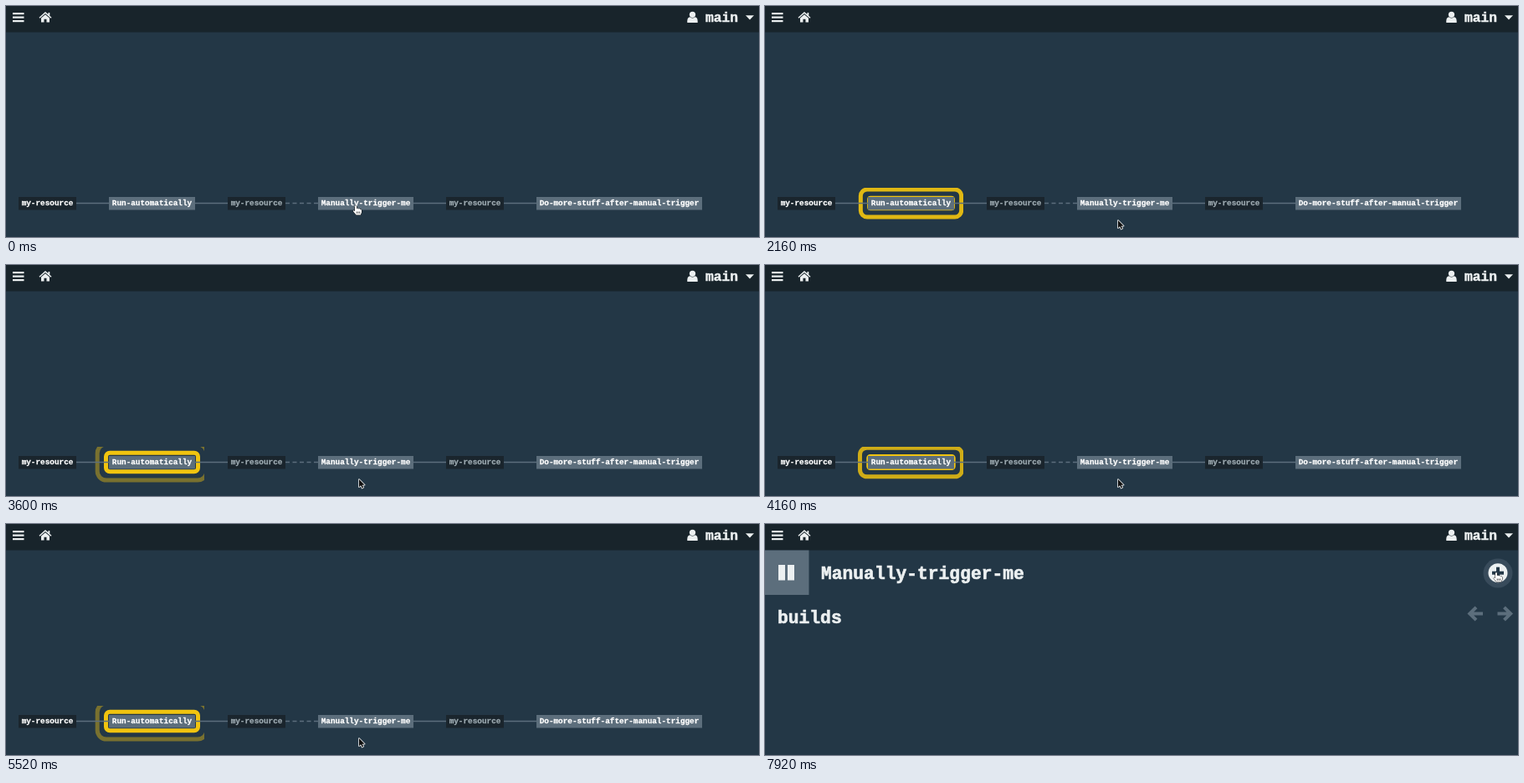
These frames come from a looping animation (900 by 277 pixels, 8000 ms). An HTML page with a canvas:

```html
<!DOCTYPE html>
<html lang="en">
<head>
<meta charset="utf-8">
<title>Pipeline</title>
<style>
html, body { margin: 0; width: 100%; height: 100%; overflow: hidden; background: #233746; }
canvas { display: block; }
</style>
</head>
<body>
<canvas id="stage" width="900" height="277"></canvas>
<script>
const ctx = document.getElementById('stage').getContext('2d');
const LOOP = 8000, STEP = 80;
const RUN_START = 1120, RUN_END = 6080, PAGE_SWITCH = 6800;
const RING_PERIOD = 960, RING_LIFE = 1920;
const BG = '#233746', BAR = '#18242b', DARK = '#1a252d', GREY = '#5c6e7c';
const LIGHT = '#ecf0f1', AMBER = '#f1c40f', GREEN = '#2ecc71', DIM = '#9daab1';
const MID_Y = 236.5;

const nodes = [
  { x: 15, w: 69, label: 'my-resource', fill: DARK, ink: '#fff' },
  { x: 123, w: 103, label: 'Run-automatically', fill: GREY, ink: '#fff' },
  { x: 265, w: 69, label: 'my-resource', fill: DARK, ink: DIM },
  { x: 373, w: 114, label: 'Manually-trigger-me', fill: GREY, ink: '#fff' },
  { x: 526, w: 69, label: 'my-resource', fill: DARK, ink: DIM },
  { x: 634, w: 198, label: 'Do-more-stuff-after-manual-trigger', fill: GREY, ink: '#fff' }
];

// Pointer tip: time, x, y
const pointerKeys = [
  [0, 418, 239], [480, 418, 239], [720, 422, 257], [6160, 422, 257],
  [6640, 427, 232], [6800, 427, 232], [7840, 873, 59], [7920, 874, 58]
];

function rect(x, y, w, h, fill) {
  ctx.fillStyle = fill;
  ctx.fillRect(x, y, w, h);
}

function disc(x, y, r, fill) {
  ctx.fillStyle = fill;
  ctx.beginPath();
  ctx.arc(x, y, r, 0, Math.PI * 2);
  ctx.fill();
}

function poly(points, fill) {
  ctx.fillStyle = fill;
  ctx.beginPath();
  points.forEach(([x, y]) => ctx.lineTo(x, y));
  ctx.closePath();
  ctx.fill();
}

function text(str, x, y, size, fill, align = 'left') {
  ctx.font = `bold ${size}px Courier, "Courier New", "Liberation Mono", monospace`;
  ctx.textAlign = align;
  ctx.fillStyle = ctx.strokeStyle = fill;
  ctx.lineWidth = size * 0.03;
  ctx.fillText(str, x, y);
  ctx.strokeText(str, x, y);
}

function drawHeader() {
  rect(0, 0, 900, 31.5, BAR);
  for (let i = 0; i < 3; i++) rect(8, 8 + i * 4.5, 13.5, 2.2, LIGHT);
  poly([[47, 7], [50.5, 10], [50.5, 8], [52.3, 8], [52.3, 11.7], [54.5, 13.8],
    [53.6, 14.8], [47, 9.1], [40.4, 14.8], [39.5, 13.8]], LIGHT);
  poly([[47, 10.3], [52, 14.6], [52, 19.5], [48.5, 19.5], [48.5, 15.7],
    [45.5, 15.7], [45.5, 19.5], [42, 19.5], [42, 14.6]], LIGHT);
  disc(820.5, 10.3, 3.6, LIGHT);
  ctx.beginPath();
  ctx.moveTo(814.3, 20);
  ctx.bezierCurveTo(814, 15, 815.5, 13.4, 817.5, 13.2);
  ctx.quadraticCurveTo(820.5, 15.6, 823.5, 13.2);
  ctx.bezierCurveTo(825.5, 13.4, 827, 15, 826.7, 20);
  ctx.fill();
  text('main', 836, 19, 16.3, LIGHT);
  poly([[884, 11.2], [894, 11.2], [889, 16.5]], LIGHT);
}

function drawRings(t) {
  const node = nodes[1];
  ctx.save();
  ctx.beginPath();
  ctx.rect(0, 218, 237, 59);
  ctx.clip();
  ctx.strokeStyle = AMBER;
  ctx.lineWidth = 5;
  const youngest = (t - RUN_START) % RING_PERIOD;
  for (const age of [youngest + RING_PERIOD, youngest]) {
    const p = age / RING_LIFE;
    const spread = 20.6 * p - 2.5;
    ctx.globalAlpha = Math.min(1, 2 - 2 * p);
    ctx.beginPath();
    ctx.roundRect(node.x - spread, MID_Y - 7.8 - spread,
      node.w + 2 * spread, 15.6 + 2 * spread, 2.5 + spread * 0.6);
    ctx.stroke();
  }
  ctx.restore();
}

function drawPipeline(t) {
  const done = t >= RUN_END;
  if (t >= RUN_START && !done) drawRings(t);
  ctx.lineWidth = 1.5;
  for (let i = 0; i < nodes.length - 1; i++) {
    ctx.strokeStyle = done && i === 1 ? GREEN : GREY;
    ctx.setLineDash(i === 2 ? [5, 3.5] : []);
    ctx.beginPath();
    ctx.moveTo(nodes[i].x + nodes[i].w, MID_Y);
    ctx.lineTo(nodes[i + 1].x, MID_Y);
    ctx.stroke();
  }
  ctx.setLineDash([]);
  nodes.forEach((n, i) => {
    rect(n.x, 229, n.w, 15.5, done && i === 1 ? GREEN : n.fill);
    text(n.label, n.x + n.w / 2, 239.2, 9.35, n.ink, 'center');
  });
}

function drawArrow(x, dir) {
  ctx.strokeStyle = GREY;
  ctx.lineWidth = 4;
  ctx.beginPath();
  ctx.moveTo(x - dir * 8.5, 107.5);
  ctx.lineTo(x + dir * 7, 107.5);
  ctx.moveTo(x - dir * 0.5, 99.8);
  ctx.lineTo(x + dir * 7.2, 107.5);
  ctx.lineTo(x - dir * 0.5, 115.2);
  ctx.stroke();
}

function drawJobPage(hover) {
  rect(0, 31.5, 52.5, 53.5, GREY);
  rect(16, 49, 8, 18.5, LIGHT);
  rect(27, 49, 8, 18.5, LIGHT);
  text('Manually-trigger-me', 67, 66, 21.3, LIGHT);
  text('builds', 15, 119, 21.3, LIGHT);
  if (hover) disc(876, 59, 17.5, '#384b5b');
  disc(876, 58.7, 11.5, LIGHT);
  rect(869, 56.7, 14, 4, BG);
  rect(874, 51.7, 4, 14, BG);
  drawArrow(849.5, -1);
  drawArrow(884, 1);
}

function pointerAt(t) {
  const next = pointerKeys.findIndex(k => k[0] > t);
  if (next < 0) return pointerKeys[pointerKeys.length - 1].slice(1);
  const [t0, x0, y0] = pointerKeys[next - 1], [t1, x1, y1] = pointerKeys[next];
  const p = (t - t0) / (t1 - t0), e = p * p * (3 - 2 * p);
  return [x0 + (x1 - x0) * e, y0 + (y1 - y0) * e];
}

const arrowShape = new Path2D('M0 0V9.3L2.2 7.3L3.6 10.6L5.2 9.9L3.8 6.7H6.7Z');
const handShape = new Path2D('M-1 1Q0-.8 1 1V4Q2.5 3 3.3 4.4Q4.8 3.6 5.3 5Q7 4.5 7 6' +
  'V8.5L5.8 11.5H.5L-3 7.2Q-3.4 5.5-1 7Z');

function drawPointer(x, y, hand) {
  ctx.save();
  ctx.translate(x, y);
  ctx.lineJoin = 'round';
  ctx.lineWidth = hand ? 1 : 1.5;
  ctx.strokeStyle = hand ? '#111' : '#fff';
  ctx.fillStyle = hand ? '#fff' : '#111';
  const shape = hand ? handShape : arrowShape;
  ctx.stroke(shape);
  ctx.fill(shape);
  if (hand) {
    ctx.lineWidth = 0.7;
    ctx.stroke(new Path2D('M1.2 7.5V9.8M3 7.5V9.8M4.8 7.5V9.8'));
  }
  ctx.restore();
}

function draw(t) {
  const [x, y] = pointerAt(t);
  const jobPage = t >= PAGE_SWITCH;
  const overButton = Math.hypot(x - 876, y - 59) < 17.5;
  const overNode = x > 373 && x < 487 && y > 229 && y < 245;
  rect(0, 0, 900, 277, BG);
  drawHeader();
  if (jobPage) drawJobPage(overButton);
  else drawPipeline(t);
  drawPointer(x, y, jobPage ? overButton : overNode);
}

function tick() {
  const t = performance.now() % LOOP;
  draw(Math.floor(t / STEP) * STEP);
  requestAnimationFrame(tick);
}
tick();
</script>
</body>
</html>
```
